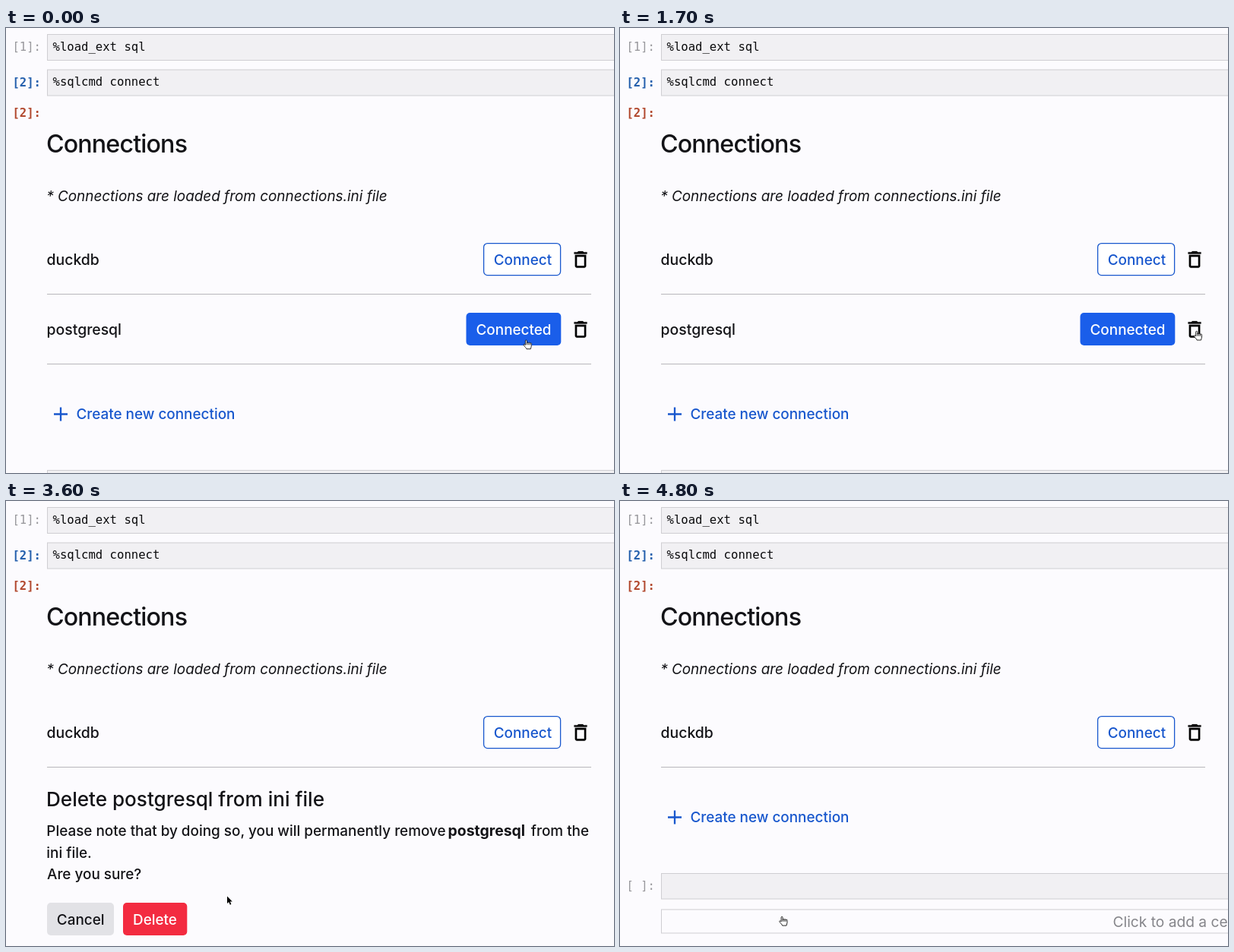
These frames come from a looping animation (800 by 586 pixels, 4.9 s). An HTML page:

```html
<!DOCTYPE html>
<html lang="en">
<head>
<meta charset="utf-8">
<title>Connections</title>
<style>
  html, body { margin: 0; width: 100%; height: 100%; overflow: hidden; background: #fcfbfe; }
  svg { display: block; width: 800px; height: 586px; }
  text {
    font: 450 18.9px Inter, "Open Sans", sans-serif;
    font-optical-sizing: none;
    fill: #131317;
    white-space: pre;
  }
  .mono { font: 400 15.6px "DejaVu Sans Mono", monospace; fill: #0a0a0c; }
  .title { font-size: 32.2px; font-weight: 550; letter-spacing: -.85px; }
  .subtitle { font-size: 26.1px; font-weight: 550; }
  .note { font-style: italic; }
  .name { font-size: 19.4px; font-weight: 500; }
  .strong { font-size: 19.4px; font-weight: 700; }
  .blue { fill: #1857cd; }
  .white { fill: #fff; }
  .hint { font-size: 19.2px; font-weight: 400; fill: #85858a; }
  .idle { fill: #98989c; }
  .in { fill: #2560ad; font-weight: 700; }
  .out { fill: #b2492f; font-weight: 700; }
</style>
</head>
<body>
<svg id="stage" viewBox="0 0 800 586"></svg>
<script>
const LOOP = 4900, STEP = 100;
const OPEN_DIALOG = 2000, DELETED = 4100;
const BLUE = '#1a5eea', LINK = '#1857cd';

const text = (x, y, str, cls = '') => `<text x="${x}" y="${y}" class="${cls}">${str}</text>`;
const mono = (x, y, str, cls = '') => text(x, y, str, 'mono ' + cls);
const box = (x, y, w, h, fill, stroke = 'none', r = 0, sw = 1) =>
  `<rect x="${x}" y="${y}" width="${w}" height="${h}" rx="${r}" fill="${fill}" stroke="${stroke}" stroke-width="${sw}"/>`;
const path = (d, attrs) => `<path d="${d}" ${attrs}/>`;
const group = (id, ...parts) => `<g id="${id}">${parts.join('')}</g>`;

const cell = (y, h, fill = '#f1f0f3') => box(54.5, y, 760, h, fill, '#cfced2');
const rule = y => path(`M54 ${y}H770`, 'stroke="#b8b7bb"');
const trash = y => path(
  'M6 19c0 1.1.9 2 2 2h8c1.1 0 2-.9 2-2V7H6zM8 9h8v10H8zM15.5 4l-1-1h-5l-1 1H5v2h14V4z',
  `transform="translate(741.5 ${y - 14.7}) scale(1.21)" fill="#000" stroke="#000" stroke-width=".2" fill-rule="evenodd"`);
const create = y =>
  path(`M63 ${y}h18M72 ${y - 9}v18`, `stroke="${LINK}" stroke-width="2.3"`) +
  text(92.4, y + 6.5, 'Create new connection', 'blue');

const page = group('page',
  box(0, 0, 800, 586, '#fcfbfe'),
  cell(8.5, 34), cell(55, 34),
  mono(8.4, 30.3, '[1]:', 'idle'), mono(61.5, 29.7, '%load_ext sql'),
  mono(8.4, 76.7, '[2]:', 'in'), mono(61.5, 76.3, '%sqlcmd connect'),
  mono(8.4, 117.3, '[2]:', 'out'),
  text(53, 163.7, 'Connections', 'title'),
  text(53.2, 228, '* Connections are loaded from connections.ini file', 'note'),
  text(53.6, 312, 'duckdb', 'name'),
  box(628.6, 283.6, 101, 42, '#fff', LINK, 5, 1.3),
  text(641.7, 312, 'Connect', 'blue'),
  trash(305), rule(350.5));

const list = group('list',
  text(53.6, 404, 'postgresql', 'name'),
  box(605.5, 375, 124.8, 43, BLUE, 'none', 5),
  text(618.5, 404, 'Connected', 'white'),
  trash(397), rule(442.5), create(508.5),
  cell(582.5, 34));

const dialog = group('dialog',
  text(53, 402, 'Delete postgresql from ini file', 'subtitle'),
  text(53.3, 441, 'Please note that by doing so, you will permanently remove'),
  text(581.6, 441, 'postgresql', 'strong'),
  text(690.8, 441, 'from the'),
  text(53.3, 469.5, 'ini file.'),
  text(54, 498, 'Are you sure?'),
  box(54, 529, 88, 43, '#e2e2e6', 'none', 5),
  text(66.8, 557.5, 'Cancel'),
  box(154, 529, 84.3, 43, '#f32b40', 'none', 5),
  text(167, 557.5, 'Delete', 'white'));

const remaining = group('remaining',
  create(416.5),
  cell(490.5, 33.5), mono(8.4, 512, '[ ]:', 'idle'),
  cell(538, 31, '#fcfbfe'), text(648.5, 561, 'Click to add a cell.', 'hint'));

// Both pointers have their hot spot at the local origin.
const hand = group('hand', path(
  'M3.1 7.4V1.8a1 1 0 0 1 2 0V5a1 1 0 0 1 2 0a1 1 0 0 1 2 .3a.9.9 0 0 1 1.9.4V8.5c0 1.5-.9 2.2-1 4H4.6' +
  'C4.4 11 2.4 9.8 1 7.6c-.7-1.1.6-1.9 1.3-1zM5.1 5v2.2M7.1 5.2v2M9.1 5.5v1.8',
  'transform="translate(-4 -1)" fill="#fff" stroke="#111" stroke-width=".9" stroke-linejoin="round"'));
const arrow = group('arrow', path(
  'M0 0V9.6L2.2 7.6L3.8 11.2L5.4 10.5L3.8 7H6.8Z',
  'fill="#000" stroke="#fff" stroke-width=".9" paint-order="stroke"'));

document.getElementById('stage').innerHTML =
  page + list + dialog + remaining + group('pointer', hand, arrow);

// Pointer track: time, x, y
const track = [
  [0, 684.3, 411.2], [800, 684.3, 411.6], [1100, 684.3, 411.6], [1600, 758.5, 399.5],
  [2700, 758.5, 399.5], [2800, 743, 402], [3600, 291, 520.5], [3900, 213.5, 548],
  [4200, 213.5, 548], [4800, 213, 547.6], [LOOP, 213, 547.6]
];

const slope = (i, k) => track[i + 1] && track[i]
  ? (track[i + 1][k] - track[i][k]) / (track[i + 1][0] - track[i][0]) : 0;

// Harmonic mean keeps the curve free of overshoot.
function tangent(i, k) {
  const a = slope(i - 1, k), b = slope(i, k);
  return a * b > 0 ? 2 * a * b / (a + b) : 0;
}

function along(t, k) {
  let i = 0;
  while (i < track.length - 2 && t >= track[i + 1][0]) i++;
  const [p, q] = [track[i], track[i + 1]];
  const d = q[0] - p[0], u = (t - p[0]) / d, v = 1 - u;
  return v * v * (1 + 2 * u) * p[k] + u * u * (1 + 2 * v) * q[k]
    + u * v * d * (v * tangent(i, k) - u * tangent(i + 1, k));
}

const el = id => document.getElementById(id);
const show = (id, on) => el(id).setAttribute('visibility', on ? 'visible' : 'hidden');

function draw(now) {
  const t = Math.floor(now % LOOP / STEP) * STEP;
  const asking = t >= OPEN_DIALOG && t < DELETED;
  const x = along(t, 1), y = along(t, 2);
  const onDelete = x > 154 && x < 238 && y > 529 && y < 572;

  show('list', t < OPEN_DIALOG);
  show('dialog', asking);
  show('remaining', t >= DELETED);
  show('hand', !asking || onDelete);
  show('arrow', asking && !onDelete);
  el('pointer').setAttribute('transform', `translate(${x} ${y})`);
}

const start = performance.now();
function tick() {
  draw(performance.now() - start);
  requestAnimationFrame(tick);
}
tick();
</script>
</body>
</html>
```
